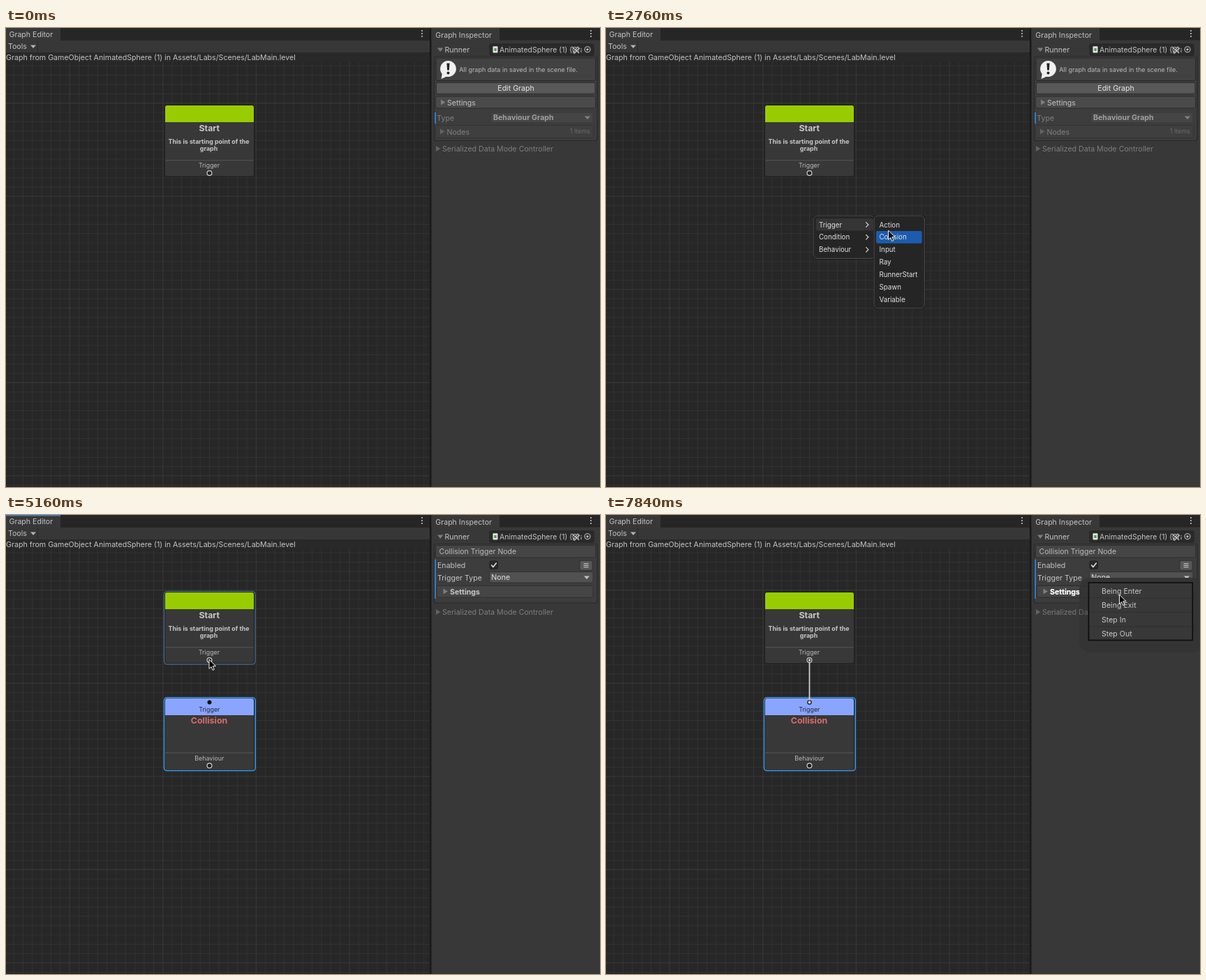
An HTML page for the animation above (8000 ms loop, 851 by 658 pixels).

```html
<!DOCTYPE html>
<html lang="en">
<head>
<meta charset="utf-8">
<title>Graph editor</title>
<style>
html, body { margin: 0; width: 100%; height: 100%; overflow: hidden; background: #282828; }
svg { display: block; width: 851px; height: 658px; }
text { font-family: Inter, Roboto, sans-serif; white-space: pre; }
</style>
</head>
<body>
<svg id="stage" viewBox="0 0 851 658" xmlns="http://www.w3.org/2000/svg"></svg>
<script>
const LOOP = 8000, STEP = 40;
const stage = document.getElementById('stage');

// Markup helpers; text is placed by the middle of its capitals.
const rect = (x, y, x2, y2, fill, more = '') =>
  `<rect x="${x}" y="${y}" width="${x2 - x}" height="${y2 - y}" fill="${fill}" ${more}/>`;
const text = (s, x, cy, fill = '#c4c4c4', size = 10.6, more = '') =>
  `<text x="${x}" y="${cy + size * 0.36}" fill="${fill}" font-size="${size}" ${more}>${s}</text>`;
const path = (d, fill, more = '') => `<path d="${d}" fill="${fill}" ${more}/>`;
const dot = (x, y, r, fill, more = '') => `<circle cx="${x}" cy="${y}" r="${r}" fill="${fill}" ${more}/>`;
const group = (id, body) => `<g id="${id}">${body}</g>`;
const MID = 'text-anchor="middle"', BOLD = 'font-weight="700"', CENTER = `${MID} ${BOLD}`;
const edge = (c, w = 1, r = 2) => `stroke="${c}" stroke-width="${w}" rx="${r}"`;
const right = (x, y, c = '#7c7c7c') => path(`M${x - 3} ${y - 4}l6.5 4l-6.5 4z`, c);
const down = (x, y, c = '#b4b4b4', w = 4) => path(`M${x - w} ${y - 2}h${2 * w}l${-w} 4.4z`, c);
const dots = x => [4, 8, 12].map(y => dot(x, y, 1.1, '#c4c4c4')).join('');
const port = (x, y) => dot(x, y, 3.4, '#212121', 'stroke="#d2d2d2" stroke-width="1.2"');

function grid() {
  const lines = (gap, x0, y0) => {
    let d = '';
    for (let x = x0; x < 607; x += gap) d += `M${x.toFixed(1)} 49V658`;
    for (let y = y0; y < 658; y += gap) d += `M0 ${y.toFixed(1)}H607`;
    return d;
  };
  return path(lines(13.36, 11, 54.2), 'none', 'stroke="#313131" stroke-width="1.2"') +
    path(lines(133.6, 91.2, 107.6), 'none', 'stroke="#363636" stroke-width="1.1"');
}

const editorBars =
  rect(0, 0, 607, 18, '#262626') + rect(0, 0, 78, 18, '#383838') +
  text('Graph Editor', 4.5, 9.5) + dots(596) +
  rect(0, 18, 607, 35, '#373737') + text('Tools', 3, 26.5) + down(39, 26.5) +
  path('M45.5 18V35', 'none', 'stroke="#2a2a2a"') +
  rect(0, 35, 607, 49, '#292929') +
  text('Graph from GameObject AnimatedSphere (1) in Assets/Labs/Scenes/LabMain.level', 0, 42.5, '#c4c4c4', 10.65) +
  group('focus', rect(0, 0, 78, 1.6, '#3a79bb'));

const nodeBody = (y, h, split, head) =>
  rect(227.5, y - 0.5, 355.5, y + h + 0.5, '#383838', edge('#1d1d1d', 1, 3)) +
  path(`M228 ${y + 24}V${y + 3}q0 -3 3 -3H352q3 0 3 3V${y + 24}z`, head) +
  path(`M228 ${split}H355`, 'none', 'stroke="#565656"');

const startNode =
  nodeBody(111, 101.5, 189.8, '#99cc00') +
  text('Start', 291.3, 143.5, '#c8c8c8', 12.4, CENTER) +
  text('This is starting point of the', 290.5, 162.3, '#c8c8c8', 8.9, CENTER) +
  text('graph', 290.5, 173.2, '#c8c8c8', 8.9, CENTER) +
  text('Trigger', 291, 196.7, '#b8b8b8', 8.9, MID) +
  group('startHover', rect(226.5, 109.5, 357, 214, 'none', edge('#4d7fa6', 1, 4)));

const hitNode =
  nodeBody(263, 102.3, 341, '#8aa5ff') +
  rect(226.5, 261.8, 357.2, 366.6, 'none', edge('#3d97e8', 1.5, 4)) +
  text('Trigger', 291.3, 278.7, '#20263c', 8.9, MID) +
  text('Collision', 291, 295, '#d96c6c', 12.4, CENTER) +
  text('Behaviour', 291.3, 348.3, '#b8b8b8', 8.9, MID) +
  group('inFree', dot(291.5, 268.5, 3, '#111')) +
  group('inUsed', dot(291.5, 268.5, 2.7, '#d8dcf0', 'stroke="#1b1b1b" stroke-width="1.3"')) +
  group('outOn', port(291.5, 359.3)) + group('outOff', dot(291.5, 359.3, 2.4, '#232323'));

const startPorts =
  group('startFree', port(291.5, 208)) +
  group('startDrag', dot(291.5, 208, 1.7, '#a8a8a8')) +
  group('startUsed', port(291.5, 208) + dot(291.5, 208, 1.7, '#d2d2d2'));

const wires =
  group('wire', path('M291.5 212V265.5', 'none', 'stroke="#cfcfcf" stroke-width="1.8"')) +
  group('ghost', path('M291.5 208V266', 'none', 'stroke="#858585" stroke-width="1.3"')) +
  '<path id="dragWire" fill="none" stroke="#b5b5b5" stroke-width="1.4"/>';

const panel =
  rect(607, 0, 610, 658, '#191919') + rect(609.5, 0, 851, 658, '#383838') +
  rect(609.5, 0, 851, 17.5, '#262626') + rect(609.5, 0, 707, 18, '#383838') +
  text('Graph Inspector', 615.3, 9.7) + dots(838) +
  path('M618 28.5h8.4l-4.2 5.6z', '#7c7c7c') + text('Runner', 628.5, 31) +
  rect(693, 23, 842, 39, '#2a2a2a', edge('#222')) +
  rect(697.5, 26.3, 704.5, 35.5, '#e4e4e4', 'rx="1"') + rect(699.3, 29, 702.7, 33, '#4f9a58') +
  `<svg x="706" y="22" width="119" height="18" viewBox="706 22 119 18">${text('AnimatedSphere (1) (Graph', 707, 31, '#c4c4c4', 10.5)}</svg>` +
  path('M812.5 35l6.5 -8l2 1.6l-6.5 8zM811 27l10 9', 'none', 'stroke="#c4c4c4" stroke-width="1.1"') +
  dot(833, 30.8, 4, 'none', 'stroke="#c4c4c4" stroke-width="1.1"') + dot(833, 30.8, 1.6, '#c4c4c4');

const serialized = y => right(619, y, '#636363') + text('Serialized Data Mode Controller', 625, y, '#7e7e7e');

const graphView =
  rect(613.5, 40.5, 847, 161.5, '#3d3d3d', edge('#2a2a2a', 1.2, 3)) +
  rect(616, 43, 844.5, 75.5, '#424242', edge('#272727')) +
  dot(633.5, 58.5, 11.4, '#f0f0f0') + path('M625 65l-1.5 8l9 -4z', '#f0f0f0') +
  path('M631.4 50.5h4.2l-.8 10h-2.6z', '#222') + dot(633.5, 64.5, 2, '#222') +
  text('All graph data in saved in the scene file.', 649.3, 59.3, '#bcbcbc', 9.03) +
  rect(616.5, 78.3, 844, 94.3, '#585858', edge('#2d2d2d')) +
  text('Edit Graph', 730.5, 86.3, '#e6e6e6', 10.6, MID) +
  rect(615.5, 98, 844.5, 115, '#4a4a4a', edge('#2d2d2d')) + right(626, 106.5) + text('Settings', 632, 106.7) +
  rect(614, 121, 616, 137, '#2f7fc4') + text('Type', 617.3, 128.7, '#808080') +
  rect(694.5, 121, 841, 136, '#454545', edge('#383838')) +
  text('Behaviour Graph', 698, 128.4, '#a0a0a0', 10.6, BOLD) + down(833, 128.5, '#848484') +
  rect(615.5, 139.5, 842, 157.5, '#3f3f3f', edge('#333')) + right(625, 148.5, '#636363') +
  text('Nodes', 631.5, 148.7, '#808080') +
  text('1 items', 836.8, 148, '#6c6c6c', 9, 'text-anchor="end"') +
  serialized(173);

const nodeView =
  rect(613.5, 41.5, 847, 126, '#3d3d3d', edge('#2a2a2a', 1.2, 3)) +
  rect(615.5, 43.5, 844.5, 61, '#454545', edge('#2d2d2d')) + text('Collision Trigger Node', 620.6, 52.5, '#bcbcbc', 10.5) +
  rect(614, 63.5, 616, 120, '#2f7fc4') +
  text('Enabled', 618, 72) + rect(693, 66, 704.5, 77.3, '#2a2a2a', edge('#202020')) +
  path('M695.3 71.5l2.6 3l4.8 -6', 'none', 'stroke="#e0e0e0" stroke-width="1.6"') +
  rect(822, 65.3, 840, 79.3, '#585858', edge('#303030')) +
  path('M827.5 69.8h7M827.5 72.3h7M827.5 74.8h7', 'none', 'stroke="#d0d0d0"') +
  text('Trigger Type', 618, 90) +
  rect(692.5, 81.5, 841, 97, '#515151', edge('#303030')) + text('None', 695.3, 89.3, '#e0e0e0') + down(832, 89.5, '#c4c4c4') +
  rect(616.8, 101.3, 841, 118.3, '#454545', edge('#2f2f2f')) + right(629.5, 109.5) +
  text('Settings', 636, 109.7, '#c8c8c8', 10.6, BOLD) +
  serialized(139);

const dropdown =
  rect(678, 90, 858, 197, '#343434', 'rx="16"') +
  text('Settings', 636, 109.7, '#fff', 10.6, BOLD) +
  text('Serialized Da', 625, 139, '#666') +
  rect(616.8, 101.3, 692, 118.3, 'none', edge('#2f2f2f')) +
  rect(691.5, 97, 840.3, 179.5, '#383838', 'stroke="#0c0c0c" stroke-width="1.6"') +
  ['Being Enter', 'Being Exit', 'Step In', 'Step Out'].map((s, i) =>
    text(s, 710, 108.7 + i * 20.5, '#c8c8c8') +
    (i ? path(`M693 ${98.4 + i * 20.5}H839.5`, 'none', 'stroke="#2e2e2e"') : '')).join('');

const menuBox = (x, y, x2, y2) =>
  rect(x - 0.8, y - 0.8, x2 + 0.8, y2 + 0.8, '#0b0b0b', 'rx="5.5"') +
  rect(x + 0.2, y + 0.2, x2 - 0.2, y2 - 0.2, '#252525', edge('#5a5a5a', 0.9, 5));
const menuRow = 17.85;
const mainMenu =
  menuBox(296.8, 268.8, 385, 330.6) +
  group('rowPicked', rect(301, 273, 381, 290.5, '#1b5cae', 'rx="2"')) +
  group('rowOpen', rect(301, 273, 383, 290.5, '#353535', 'rx="2"')) +
  ['Trigger', 'Condition', 'Behaviour'].map((s, i) => {
    const y = 282 + i * menuRow;
    return text(s, 305, y, '#e2e2e2', 9.75) +
      path(`M372.3 ${y - 3.6}l3.6 3.6l-3.6 3.6`, 'none', 'stroke="#d8d8d8" stroke-width="1.2"');
  }).join('');
const subMenu =
  menuBox(383.8, 268.8, 456.5, 402) +
  group('subPicked', rect(387, 291, 452.7, 308.7, '#1b5cae', 'rx="2"')) +
  ['Action', 'Collision', 'Input', 'Ray', 'RunnerStart', 'Spawn', 'Variable'].map((s, i) =>
    text(s, 391.5, 282 + i * menuRow, '#e2e2e2', 9.75)).join('');

const ring = (id, c) => group(id,
  dot(0.4, 1.4, 17.7, 'none', `stroke="${c}" stroke-width="4.8"`) +
  dot(0.4, 1.4, 17.7, 'none', 'stroke="#f2f2f2" stroke-width="2"'));
const pointer = ring('ringRight', '#2db52d') + ring('ringLeft', '#0a0a0a') +
  path('M0 0V13.4L3.1 10.6L5.2 15.5L7.4 14.5L5.3 9.7H9.5Z', '#050505', 'stroke="#f4f4f4" stroke-width="1"');

stage.innerHTML =
  rect(0, 0, 851, 658, '#272727') + grid() + editorBars +
  group('guides', path('M225.2 108V368M358.6 108V368', 'none', 'stroke="#44617a" stroke-width="1"')) +
  startNode + group('hitNode', hitNode) + wires + startPorts +
  panel + group('graphView', graphView) + group('nodeView', nodeView) + group('dropdown', dropdown) +
  group('mainMenu', mainMenu) + group('subMenu', subMenu) + group('pointer', pointer);

const el = {};
stage.querySelectorAll('[id]').forEach(e => { el[e.id] = e; });
const show = (id, on) => el[id].setAttribute('visibility', on ? 'inherit' : 'hidden');

// Keys are [time, x, y]; a repeated place is a rest.
const pointerKeys = [
  [40, 733, 658], [560, 292, 258.7], [1440, 292, 258.7], [1520, 307, 281], [1680, 307, 281],
  [1720, 311, 280], [2000, 311, 280], [2320, 417, 290], [2480, 417, 290], [2760, 404.5, 290],
  [3040, 404.5, 290], [3280, 318, 279.5], [3600, 318, 279.5], [3760, 285, 277], [3880, 285, 277],
  [4080, 324, 276.5], [4320, 324, 276.5], [4880, 296, 211], [5040, 296, 211], [5160, 291, 207],
  [5360, 291, 207], [5400, 291.5, 206.5], [5600, 291.5, 206.5], [5960, 294.8, 267], [6200, 294.8, 267],
  [6400, 301, 283], [6540, 301, 283], [6600, 304, 284], [6720, 304, 284], [7160, 735.5, 88],
  [7600, 735.5, 88], [7840, 735.5, 114]
];
const nodeKeys = [[3600, 67.5, 0.8], [3760, -40, 0.8], [3880, -40, 0.8], [4080, 0, 0]];

function at(keys, t) {
  if (t <= keys[0][0]) return keys[0].slice(1);
  const i = keys.findIndex(k => k[0] >= t);
  if (i < 0) return keys[keys.length - 1].slice(1);
  const [t0, x0, y0] = keys[i - 1], [t1, x1, y1] = keys[i];
  const u = (t - t0) / (t1 - t0), e = u * u * (3 - 2 * u);
  return [x0 + (x1 - x0) * e, y0 + (y1 - y0) * e];
}

function draw(t) {
  const during = (a, b = LOOP) => t >= a && t < b;
  const move = (id, [x, y]) => el[id].setAttribute('transform', `translate(${x.toFixed(2)} ${y.toFixed(2)})`);
  const tip = at(pointerKeys, t);
  const dragging = during(5640, 6240), linked = t >= 6240, selected = t >= 3640;

  show('pointer', t >= 40);
  move('pointer', tip);
  show('ringRight', during(1160, 1240));
  show('ringLeft', during(2920, 3040) || during(3400, 4320) || during(5600, 6240) || during(7440, 7600));

  show('mainMenu', during(1200, 3040));
  show('rowPicked', during(1520, 2080));
  show('rowOpen', during(2080, 3040));
  show('subMenu', during(1720, 3040));
  show('subPicked', during(2240, 3040));

  show('hitNode', t >= 3040);
  move('hitNode', at(nodeKeys, t));
  show('guides', during(4080, 4360));
  show('startHover', during(5080, 5640));

  show('startFree', !dragging && !linked);
  show('startDrag', dragging);
  show('startUsed', linked);
  const docked = during(5920) && t >= 3040;
  show('inFree', t >= 3040 && !docked);
  show('inUsed', docked);
  show('outOn', t >= 3040 && !dragging);
  show('outOff', dragging);
  show('wire', linked);
  show('ghost', during(5920, 6240));
  show('dragWire', dragging);
  if (dragging) {
    const [x, y] = tip, d = y - 208;
    el.dragWire.setAttribute('d',
      `M291.5 208V${208 + d * 0.42}C291.5 ${208 + d * 0.5} ${x} ${208 + d * 0.52} ${x} ${208 + d * 0.64}V${y}`);
  }

  show('graphView', !selected);
  show('nodeView', selected);
  show('focus', during(3640, 7440));
  show('dropdown', t >= 7520);
}

function tick(now) {
  draw(Math.floor((now % LOOP) / STEP) * STEP);
  requestAnimationFrame(tick);
}
draw(0);
requestAnimationFrame(tick);
</script>
</body>
</html>
```
